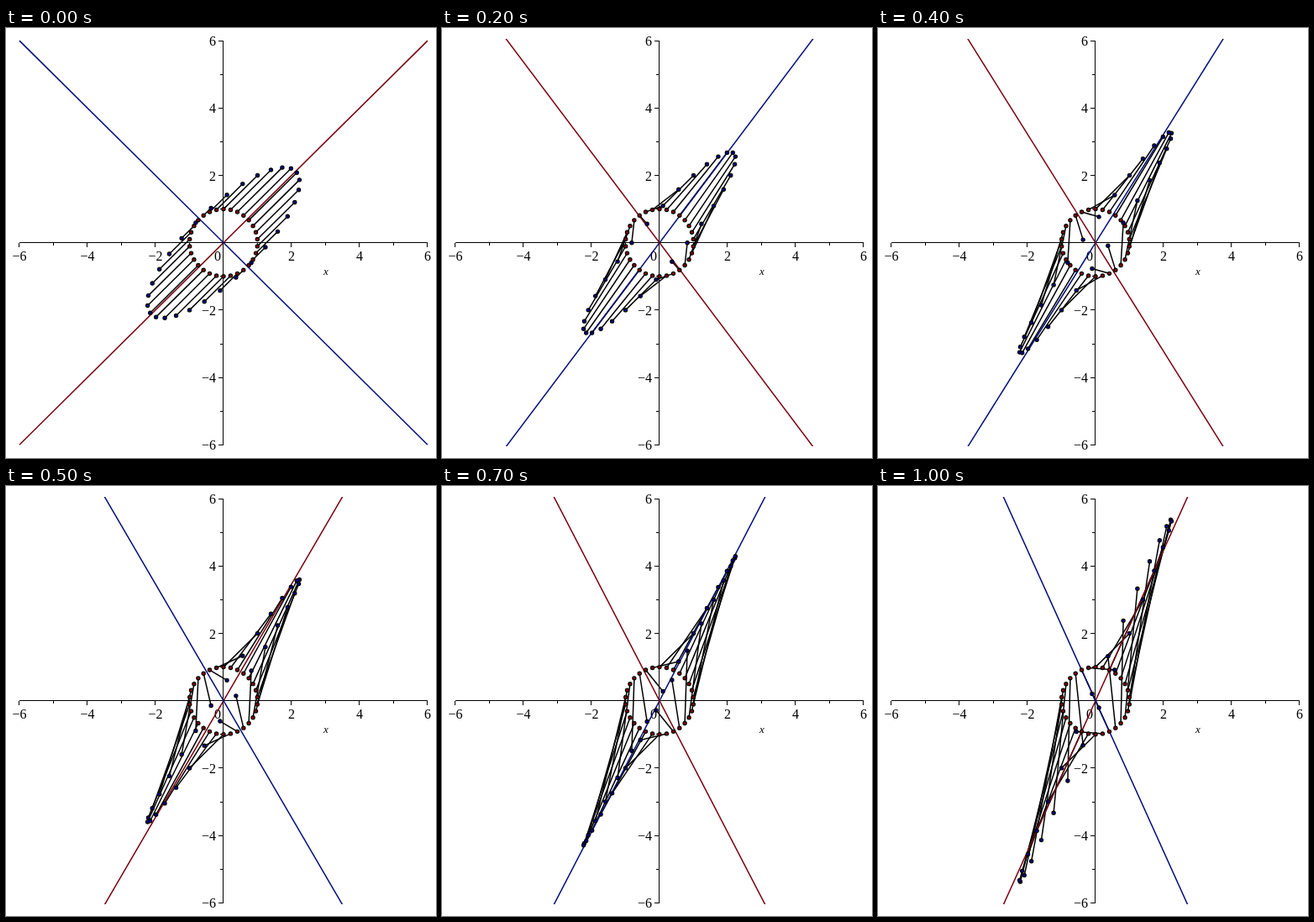
Recreate the animation shown at these times as an HTML page. Size 512x512 px, loop 1.1 s.

```html
<!DOCTYPE html>
<html lang="en">
<head>
<meta charset="utf-8">
<title>Eigenvectors of a changing matrix</title>
<style>
  html, body { margin: 0; width: 100%; height: 100%; overflow: hidden; background: #fff; }
  svg { display: block; width: 100vw; height: 100vh; }
  text { font: 16px "Liberation Serif", "Times New Roman", serif; fill: #000; }
  #axes path { stroke: #000; stroke-width: 1; fill: none; }
  .link { stroke: #000; stroke-width: 1.5; }
  .eigen { stroke-width: 1.5; }
  .dot { stroke: #000; stroke-width: 1.2; }
</style>
</head>
<body>
<svg viewBox="0 0 512 512">
  <clipPath id="view"><rect x="14" y="13" width="490" height="485"/></clipPath>
  <g id="axes"></g>
  <g id="plot" clip-path="url(#view)"></g>
</svg>
<script>
const RED = "#78000e", BLUE = "#000e78";
const STEP_MS = 100, STEPS = 11, COUNT = 30;
const sx = x => 259 + 40.5 * x;
const sy = y => 255.7 - 40.1 * y;
const axes = document.getElementById("axes");
const plot = document.getElementById("plot");

function add(parent, tag, attrs, text) {
  const el = document.createElementNS("http://www.w3.org/2000/svg", tag);
  set(el, attrs);
  if (text) el.textContent = text;
  parent.append(el);
  return el;
}

function set(el, attrs) {
  for (const key in attrs) el.setAttribute(key, attrs[key]);
}

function setLine(el, x1, y1, x2, y2) {
  set(el, { x1: sx(x1), y1: sy(y1), x2: sx(x2), y2: sy(y2) });
}

function drawAxes() {
  let d = "M16 255.5H502M258.5 15V497";
  for (let v = -6; v <= 6; v++) {
    const major = v % 2 === 0;
    const px = Math.floor(sx(v) - 0.01) + 0.5;
    const py = Math.floor(sy(v)) + 0.5;
    const size = major ? 5 : 3;
    d += `M${px} 256v${size}M258 ${py}h${-size}`;
    if (!major) continue;
    const label = String(v).replace("-", "\u2212");
    add(axes, "text", { x: v ? sx(v) : 252, y: 277, "text-anchor": "middle" }, label);
    if (v) add(axes, "text", { x: 250, y: sy(v) + 6, "text-anchor": "end" }, label);
  }
  add(axes, "path", { d });
  add(axes, "text", { x: 378, y: 294, style: "font-size:13px;font-style:italic" }, "x");
}

drawAxes();

const unit = Array.from({ length: COUNT }, (_, i) => {
  const angle = (6 + 12 * i) * Math.PI / 180;
  return { x: Math.cos(angle), y: Math.sin(angle) };
});
const links = unit.map(() => add(plot, "line", { class: "link" }));
const rising = add(plot, "line", { class: "eigen" });
const falling = add(plot, "line", { class: "eigen" });
const addDot = fill => add(plot, "circle", { class: "dot", r: 2.1, fill });
unit.forEach(p => set(addDot("#8c0000"), { cx: sx(p.x), cy: sy(p.y) }));
const images = unit.map(() => addDot("#00008c"));

// Matrix [[2, 1], [c, 2]] has eigenvectors (1, ±√c).
function render(time) {
  const step = Math.floor(time / STEP_MS) % STEPS;
  const c = 1 + 0.4 * step;
  const slope = Math.sqrt(c);
  const whole = step % 5 === 0;

  unit.forEach((p, i) => {
    const x = 2 * p.x + p.y;
    const y = c * p.x + 2 * p.y;
    setLine(links[i], p.x, p.y, x, y);
    set(images[i], { cx: sx(x), cy: sy(y) });
  });
  setLine(rising, -6, -6 * slope, 6, 6 * slope);
  setLine(falling, -6, 6 * slope, 6, -6 * slope);
  set(rising, { stroke: whole ? RED : BLUE });
  set(falling, { stroke: whole ? BLUE : RED });
}

const start = performance.now();
function tick() {
  render(performance.now() - start);
  requestAnimationFrame(tick);
}
tick();
</script>
</body>
</html>
```
